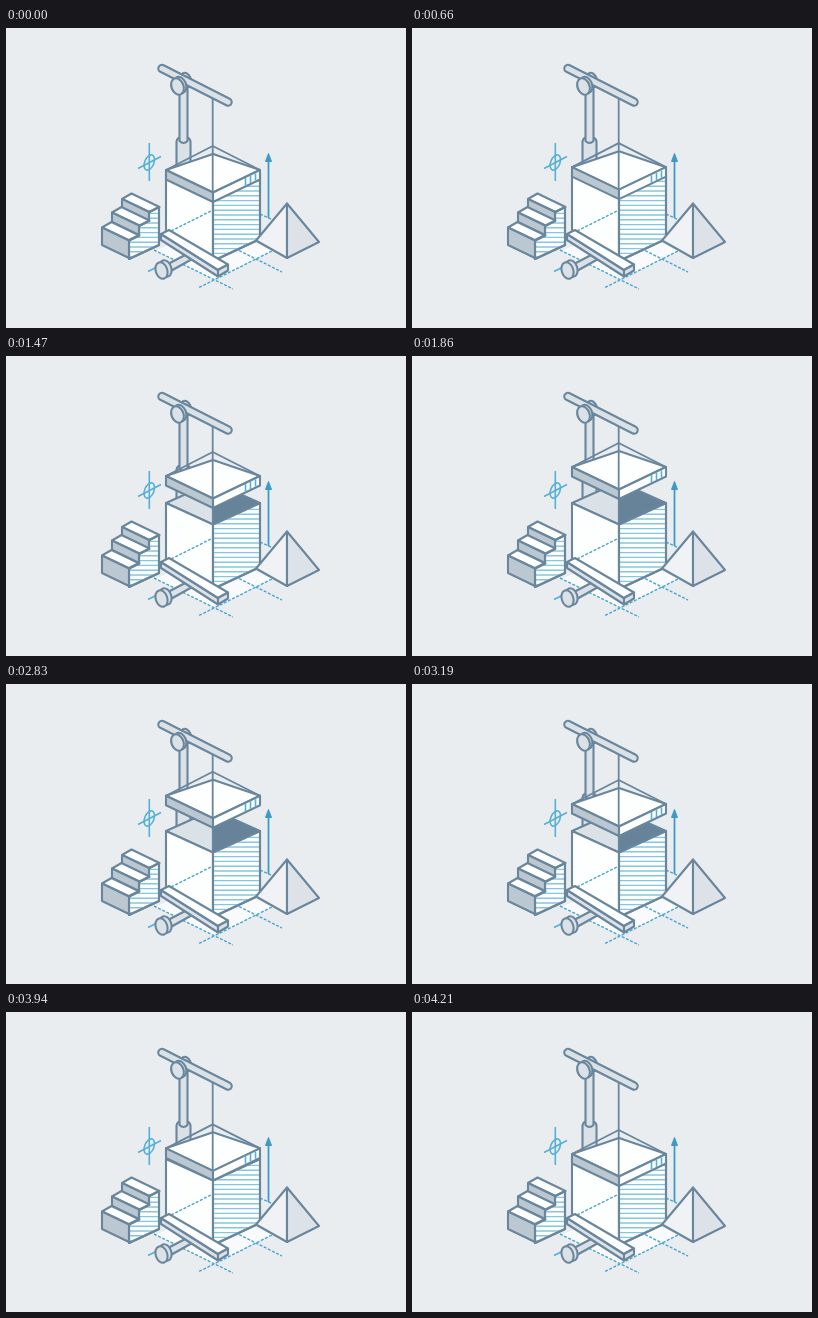
These frames come from a looping animation (400x300 px, 4710 ms). An HTML page:

```html
<!DOCTYPE html>
<html lang="en">
<head>
<meta charset="utf-8">
<title>Crane lifting a lid</title>
<style>
html, body { margin: 0; width: 100%; height: 100%; overflow: hidden; background: #e9edf0; }
svg { display: block; width: 100vw; height: 100vh; }
.ink { stroke: #69869c; stroke-width: 2.1; stroke-linejoin: round; stroke-linecap: round; }
.rope { stroke: #69869c; stroke-width: 1.8; fill: none; stroke-linecap: round; stroke-linejoin: round; }
.blue { stroke: #56b0d4; stroke-width: 1.6; fill: none; }
.dash { stroke: #4aa5cf; stroke-width: 1.4; fill: none; stroke-dasharray: 3 1.6; }
.hatch { stroke: #86c6e0; stroke-width: 1.4; fill: none; }
.white { fill: #fdfefe; }
.pale { fill: #dae1e7; }
.grey { fill: #bcc8d1; }
.dark { fill: #66839a; }
</style>
</head>
<body>
<svg viewBox="0 0 400 300" preserveAspectRatio="xMidYMid meet">
  <defs>
    <clipPath id="boxSide"><path d="M207 168.500L254 147V211L207 233Z"/></clipPath>
    <clipPath id="stairSide"><path d="M123 212L133 207V198L143 193V184L153 179V217L123 231Z"/></clipPath>
  </defs>

  <!-- floor plan -->
  <path class="white" d="M208 252L150 223L207 194L266 223Z" opacity=".8"/>
  <path class="dash" d="M254 186L271 194M229 220.500L276 244M274 219L192 260M148 222L227 261"/>
  <path class="blue" d="M142 243.500L152 238.500"/>

  <!-- axis mark and arrow -->
  <g class="blue">
    <path d="M143.300 115V153M132 140.500L155 128.500"/>
    <ellipse cx="143.300" cy="134.500" rx="4.600" ry="8" transform="rotate(22 143.300 134.500)"/>
    <path d="M262.500 190V130" stroke="#3d9ac8" stroke-width="1.8"/>
    <path d="M262.500 125.500L265.500 133.500H259.500Z" fill="#3d9ac8" stroke="#3d9ac8" stroke-width="1"/>
  </g>

  <!-- crane post -->
  <g class="ink">
    <path class="pale" d="M170.500 146V113.500Q171 109 177.500 109Q184 109 184.500 113.500V146Z"/>
    <path class="pale" d="M173.500 54V113Q177.500 117 181.500 113V50Z"/>
    <ellipse class="pale" cx="180" cy="52" rx="5" ry="7.500" transform="rotate(-20 180 52)"/>
  </g>

  <!-- open box -->
  <g class="ink">
    <path class="pale" d="M160 147L207 126V168.500Z"/>
    <path class="dark" d="M207 126L254 147L207 168.500Z"/>
    <path class="white" d="M160 147L207 168.500V233L160 211Z"/>
    <path class="white" d="M207 168.500L254 147V211L207 233Z"/>
  </g>
  <path id="boxLines" class="hatch" clip-path="url(#boxSide)"/>
  <path class="dash" d="M161 205L207 182"/>
  <path class="ink" d="M207 168.500L254 147V211L207 233Z" fill="none"/>

  <!-- lid with its slings -->
  <g id="lid">
    <g class="ink">
      <path class="white" d="M160 142L207 126L254 142L207 164.500Z"/>
      <path class="grey" d="M160 142L207 164.500V174L160 151.500Z"/>
      <path class="white" d="M207 164.500L254 142V151.500L207 174Z"/>
    </g>
    <path class="blue" d="M239.500 150V157.500M244.500 147.500V155M249.500 145.500V152.500"/>
    <path class="rope" d="M160 142L206.700 118L254 142M206.700 118V164"/>
  </g>
  <path id="rope" class="rope"/>

  <!-- crane arm -->
  <g stroke-linecap="round">
    <path d="M156 40.500L222 74" stroke="#69869c" stroke-width="9.500"/>
    <path d="M156 40.500L222 74" stroke="#dae1e7" stroke-width="5.300"/>
  </g>
  <g class="ink">
    <ellipse class="pale" cx="174" cy="57" rx="6" ry="8.500" transform="rotate(-22 174 57)"/>
    <ellipse class="pale" cx="171.500" cy="58.500" rx="6" ry="8.500" transform="rotate(-22 171.500 58.500)"/>
  </g>

  <!-- stairs -->
  <g class="ink">
    <path class="white" d="M123 212L133 207V198L143 193V184L153 179V217L123 231Z"/>
    <path id="stairLines" class="hatch" clip-path="url(#stairSide)"/>
    <g id="steps"></g>
    <path fill="none" d="M123 212L133 207V198L143 193V184L153 179V217L123 231Z"/>
  </g>

  <!-- pyramid -->
  <g class="ink">
    <path fill="#f0f2f5" d="M281 175.500L250 212.500L281 230Z"/>
    <path fill="#dde2e8" d="M281 175.500L313 214L281 230Z"/>
  </g>

  <!-- bolt and plank -->
  <g class="ink">
    <path class="pale" d="M160 237L183 225L188 230L163 244Z"/>
    <ellipse class="pale" cx="159.500" cy="240.500" rx="5.800" ry="8.500" transform="rotate(-18 159.500 240.500)"/>
    <ellipse class="pale" cx="155.500" cy="242.500" rx="5.800" ry="8.500" transform="rotate(-18 155.500 242.500)"/>
    <path class="pale" d="M155 206L212 242V248.500L155 212Z"/>
    <path class="white" d="M155 206L163 202L222 236.500L212 242Z"/>
    <path class="pale" d="M212 242L222 236.500V242.500L212 248.500Z"/>
  </g>
</svg>
<script>
const LOOP = 4710;
const REST = 118; // height of the hook while the lid is closed
const LIFT = [[0, 0], [540, 0], [1050, 12], [1470, 22], [1860, 31],
              [2800, 31], [3190, 22], [3640, 12], [4210, 0], [LOOP, 0]];
const $ = id => document.getElementById(id);

function rows(id, x0, x1, y0, y1, gap) {
  let d = "";
  for (let y = y0; y < y1; y += gap) d += `M${x0} ${y}H${x1}`;
  $(id).setAttribute("d", d);
}

function buildSteps() {
  const treads = [[116, 171, 9], [106, 184.5, 9.5], [96, 199.5, 17.5]];
  $("steps").innerHTML = treads.map(([x, y, h]) =>
    `<path class="white" d="M${x} ${y}l9.500-5.500l28 13.500l-10 5Z"/>` +
    `<path class="grey" d="M${x} ${y}l27 13v${h}l-27-13Z"/>`).join("");
}

function liftAt(t) {
  const i = LIFT.findIndex(([end]) => t < end);
  const [t0, a] = LIFT[i - 1], [t1, b] = LIFT[i];
  return a + (b - a) * (t - t0) / (t1 - t0);
}

function draw(t) {
  const lift = liftAt(t);
  $("lid").setAttribute("transform", `translate(0 ${-lift})`);
  $("rope").setAttribute("d", `M206.7 70V${REST - lift}`);
}

rows("boxLines", 207, 254, 153.4, 232, 4.8);
rows("stairLines", 123, 153, 185.4, 231, 4.8);
buildSteps();

const start = performance.now();
function tick() {
  draw((performance.now() - start) % LOOP);
  requestAnimationFrame(tick);
}
tick();
</script>
</body>
</html>
```
